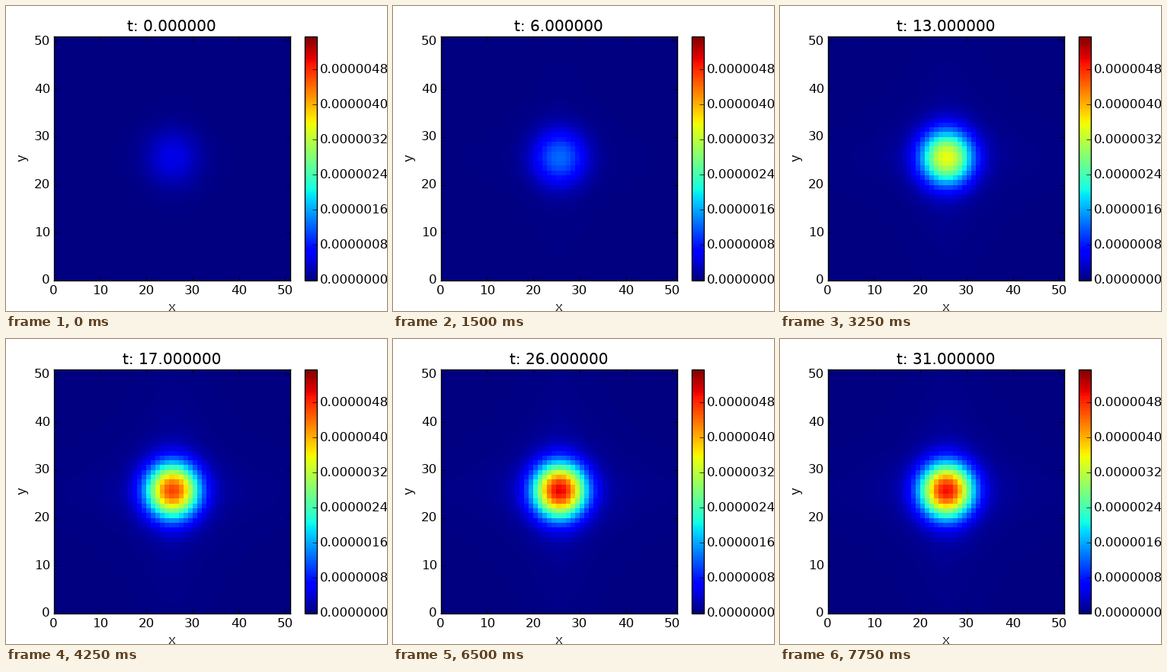
A matplotlib script that plays this animation: 500x400 px, repeating every 8000 ms.

```python
import numpy as np
import matplotlib.pyplot as plt
from matplotlib.animation import FuncAnimation

plt.style.use("classic")
plt.rcParams["font.family"] = "DejaVu Sans"
plt.rcParams["text.hinting"] = "native"

W, H, DPI = 500, 400, 100
CELLS, STEPS, STEP_MS = 51, 32, 250
VMIN, VMAX = -1e-8, 5.555e-6
CORE_RADIUS, ARM_WIDTH = 5.65, 6
ARM_SHARE = 0.12
CENTRE = CELLS // 2 + 0.2

# Peak height, as a share of the colour range, at a few moments
KNOT_T = np.array([0, 4, 9, 17, 22, 26, 31])
KNOT_V = np.array([0.092, 0.138, 0.40, 0.84, 0.995, 0.91, 0.895])
KNOT_SLOPE = np.gradient(KNOT_V, KNOT_T)


def peak(t):
    """Cubic Hermite curve through the knots."""
    i = min(np.searchsorted(KNOT_T, t, side="right") - 1, len(KNOT_T) - 2)
    h = KNOT_T[i + 1] - KNOT_T[i]
    s = (t - KNOT_T[i]) / h
    return ((1 + 2 * s) * (1 - s) ** 2 * KNOT_V[i]
            + s * (1 - s) ** 2 * h * KNOT_SLOPE[i]
            + s ** 2 * (3 - 2 * s) * KNOT_V[i + 1]
            + s ** 2 * (s - 1) * h * KNOT_SLOPE[i + 1])


# A round core on a faint cross with long arms
offset = np.arange(CELLS) - CENTRE
dx, dy = np.meshgrid(offset, offset)
core = np.exp(-(np.hypot(dx, dy) / CORE_RADIUS) ** 2.15)
arm = 1 / (1 + (offset / ARM_WIDTH) ** 2)
shape = (1 - ARM_SHARE) * core + ARM_SHARE * np.outer(arm, arm)
shape /= shape.max()


def field(t):
    return VMAX * peak(t) * shape


fig, ax = plt.subplots(figsize=(W / DPI, H / DPI), dpi=DPI, facecolor="white")
edges = np.arange(CELLS + 1)
mesh = ax.pcolormesh(edges, edges, field(0), cmap="jet", vmin=VMIN, vmax=VMAX)
ax.set(xlim=(0, CELLS), ylim=(0, CELLS),
       xticks=range(0, 51, 10), yticks=range(0, 51, 10))
ax.tick_params(pad=3.3)
bar = fig.colorbar(mesh, ax=ax, ticks=np.arange(7) * 8e-7, format="%.7f")
bar.ax.tick_params(direction="in", pad=2.8)

title = ax.set_title("t: 0.000000")
fig.text(217.5 / W, 1 - 400 / H, "x", size=12, ha="center", va="baseline")
fig.text(25.5 / W, 1 - 199.5 / H, "y", size=12, rotation=90,
         rotation_mode="anchor", ha="center", va="baseline")


def update(t):
    mesh.set_array(field(t))
    title.set_text(f"t: {t:.6f}")
    return mesh, title


anim = FuncAnimation(fig, update, frames=STEPS, interval=STEP_MS,
                     repeat=True, repeat_delay=0)
plt.show()
```
